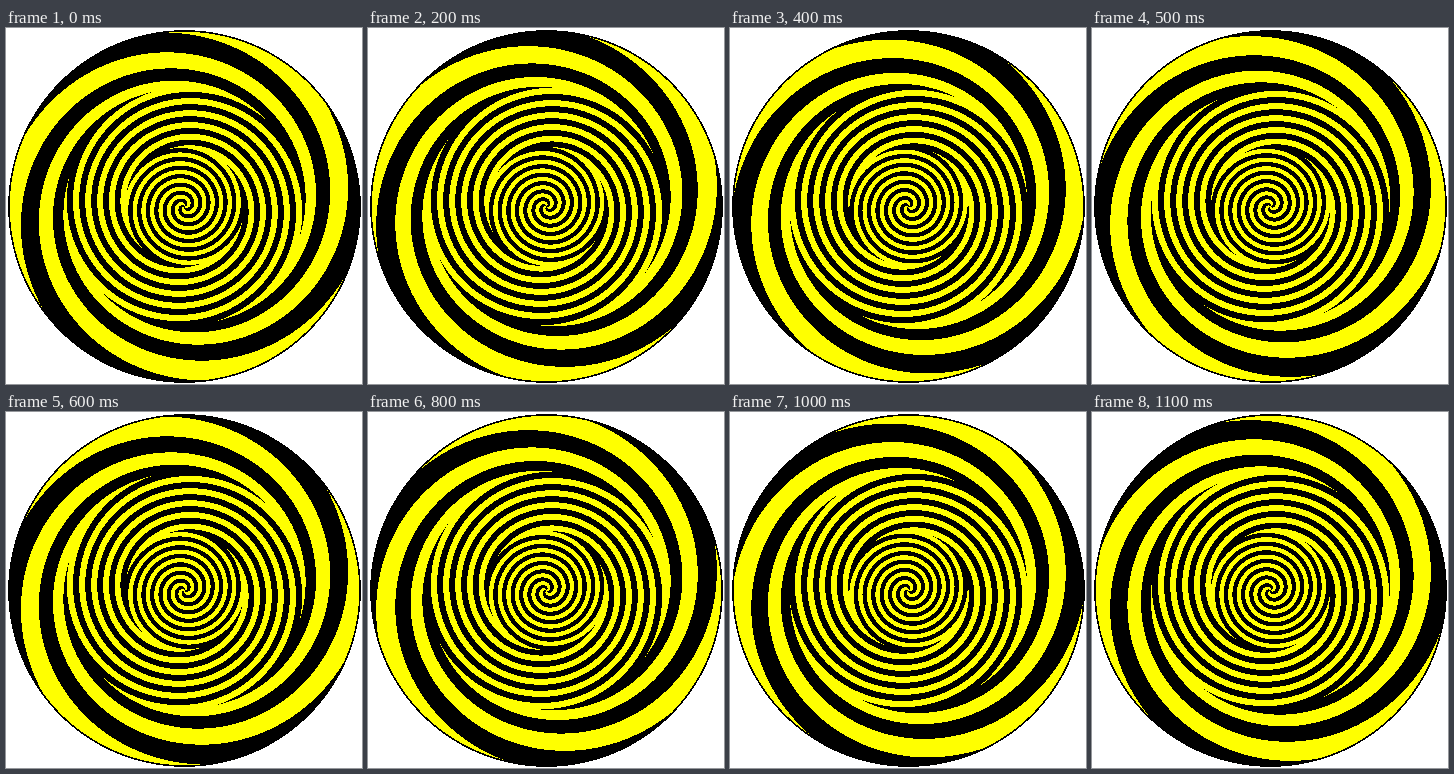
An HTML page with a canvas that plays this animation: 356x356 px, repeating every 1.2 s.

```html
<!DOCTYPE html>
<html lang="en">
<head>
<meta charset="utf-8">
<title>Spinning spiral</title>
<style>
  html, body { margin: 0; width: 100%; height: 100%; overflow: hidden; background: #fff; }
  canvas { display: block; width: 356px; height: 356px; image-rendering: pixelated; }
</style>
</head>
<body>
<canvas id="stage" width="356" height="356"></canvas>
<script>
const SIZE = 356, CENTER = 178, RADIUS = 176.3, RIM = 1.6, ZONE_WIDTH = 59.5;
const ARMS = 3, STEP_MS = 100, STEPS = 12, START = 14 / 120;
const BLACK = 0xff000000, YELLOW = 0xff00ffff, WHITE = 0xffffffff;

// Concentric zones from the middle out: bands across the zone (the sign is
// the winding direction) and evenness of their widths.
const ZONES = [
  { bands: 7, even: 0.95 },
  { bands: -5, even: 0.95 },
  { bands: 2, even: 0.5 },
];

const ctx = document.getElementById("stage").getContext("2d");
const image = ctx.createImageData(SIZE, SIZE);
const pixels = new Uint32Array(image.data.buffer).fill(WHITE);
const phase = new Float32Array(SIZE * SIZE).fill(NaN);

// Turns wound from the zone's outer edge down to radius r.
// Whole band counts keep the arms joined where two zones meet.
function winding(r) {
  const index = Math.floor(r / ZONE_WIDTH);
  const { bands, even } = ZONES[index];
  const t = r / ZONE_WIDTH - index;
  const bend = 1 - even;
  const s = (Math.sqrt(even * even + 4 * bend * t) - even) / (2 * bend);
  return bands * (1 - s);
}

for (let y = 0, i = 0; y < SIZE; y++) {
  for (let x = 0; x < SIZE; x++, i++) {
    const dx = x - CENTER, dy = y - CENTER, r = Math.hypot(dx, dy);
    if (r > RADIUS) continue;
    pixels[i] = BLACK;
    if (r > RADIUS - RIM) continue;
    phase[i] = Math.atan2(dy, dx) / (2 * Math.PI) * ARMS - START - winding(r);
  }
}

function draw(step) {
  const turn = step / STEPS;
  for (let i = 0; i < phase.length; i++) {
    if (Number.isNaN(phase[i])) continue;
    const p = phase[i] - turn;
    pixels[i] = p - Math.floor(p) < 0.5 ? YELLOW : BLACK;
  }
  ctx.putImageData(image, 0, 0);
}

let shown = -1;
const begin = performance.now();
function tick() {
  const step = Math.floor((performance.now() - begin) / STEP_MS) % STEPS;
  if (step !== shown) draw(shown = step);
  requestAnimationFrame(tick);
}
tick();
</script>
</body>
</html>
```
